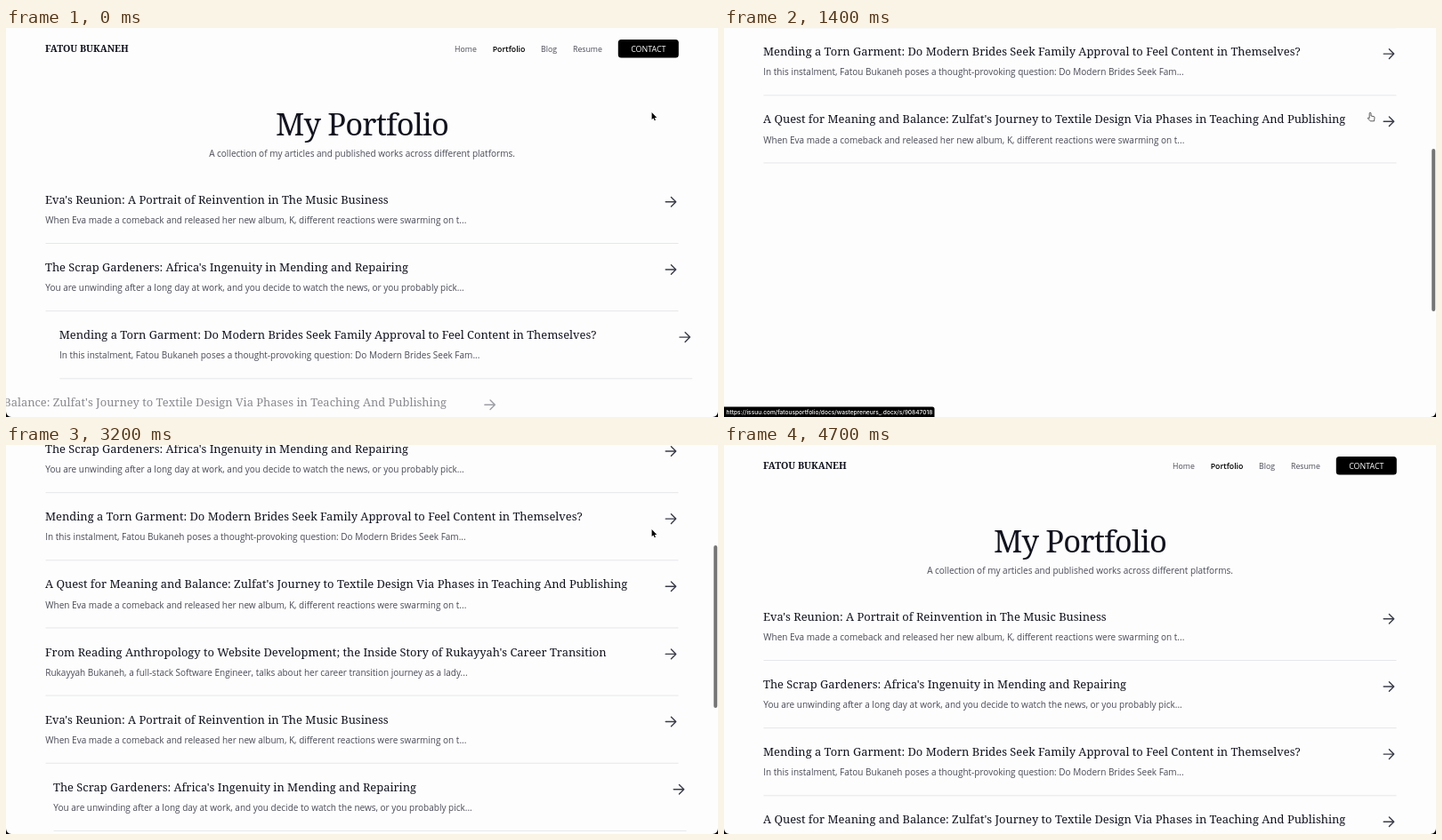
An HTML page that plays this animation: 800x438 px, repeating every 5 s.

```html
<!DOCTYPE html>
<html lang="en">
<head>
<meta charset="utf-8">
<title>My Portfolio</title>
<style>
  html, body { margin: 0; width: 100%; height: 100%; overflow: hidden; background: #fdfdfd; }
  svg { display: block; width: 800px; height: 438px; }
  text { font: 10px "Open Sans", sans-serif; fill: #4a4b57; }
  .brand, .heading, .title { font-family: "Noto Serif", serif; fill: #12131f; }
  .brand { font-size: 10.6px; font-weight: 600; }
  .heading { font-size: 34.5px; letter-spacing: -.85px; text-anchor: middle; }
  .title { font-size: 12.9px; }
  .hover .title { fill: #4b4c56; }
  .nav { font-size: 8.75px; }
  .active { font-weight: 600; fill: #000; }
  .button { font-size: 8.9px; font-weight: 500; fill: #fff; text-anchor: middle; }
  .mid { text-anchor: middle; }
  .rule { stroke: #e6e7ea; }
  .arrow { fill: none; stroke: #3a3c4a; stroke-width: 1.4; stroke-linecap: round; stroke-linejoin: round; }
  #status text { font: 500 6.6px Inter, sans-serif; fill: #fff; }
</style>
</head>
<body>
<svg viewBox="0 0 800 438">
  <rect width="800" height="438" fill="#fdfdfd"/>
  <g id="page">
    <text class="brand" x="44" y="27">FATOU BUKANEH</text>
    <text class="nav" x="504" y="26.5">Home</text>
    <text class="nav active" x="546.7" y="26.5">Portfolio</text>
    <text class="nav" x="601" y="26.5">Blog</text>
    <text class="nav" x="637" y="26.5">Resume</text>
    <rect x="687.8" y="13" width="68" height="20.6" rx="3.5"/>
    <text class="button" x="721.8" y="26.5">CONTACT</text>
    <text class="heading" x="400" y="120.5">My Portfolio</text>
    <text class="mid" x="400" y="144.8">A collection of my articles and published works across different platforms.</text>
    <g id="list"></g>
  </g>
  <rect id="thumb" x="795.2" width="4" height="183" rx="2" fill="#757575"/>
  <g id="status">
    <path id="statusBox"/>
    <text id="statusText" x="2.5" y="434.8"></text>
  </g>
  <path d="M0 432V438H6A6 6 0 0 1 0 432ZM800 432V438H794A6 6 0 0 0 800 432Z"/>
  <g id="cursor">
    <path id="pointer" d="M0 0V8L1.9 6.4 3.1 9.2 4.3 8.7 3.1 6H5.6Z" stroke="#fff" stroke-width=".9" paint-order="stroke"/>
    <path id="hand" transform="translate(-3 0)" fill="#fff" stroke="#333" stroke-width=".8" stroke-linejoin="round"
      d="M2.6 5.2V1.2a.9.9 0 0 1 1.8 0V4l3.2.7q1 .3.8 1.4L7.9 9.8H3.6L.6 6.6q.7-1.4 2 0z"/>
  </g>
</svg>
<script>
const $ = id => document.getElementById(id);
const LOOP = 5000, STEP = 100, PITCH = 76.15, SLIDE = 400;

const articles = [
  ["Eva's Reunion: A Portrait of Reinvention in The Music Business",
   "When Eva made a comeback and released her new album, K, different reactions were swarming on t..."],
  ["The Scrap Gardeners: Africa's Ingenuity in Mending and Repairing",
   "You are unwinding after a long day at work, and you decide to watch the news, or you probably pick..."],
  ["Mending a Torn Garment: Do Modern Brides Seek Family Approval to Feel Content in Themselves?",
   "In this instalment, Fatou Bukaneh poses a thought-provoking question: Do Modern Brides Seek Fam..."],
  ["A Quest for Meaning and Balance: Zulfat's Journey to Textile Design Via Phases in Teaching And Publishing",
   "When Eva made a comeback and released her new album, K, different reactions were swarming on t..."],
  ["From Reading Anthropology to Website Development; the Inside Story of Rukayyah's Career Transition",
   "Rukayyah Bukaneh, a full-stack Software Engineer, talks about her career transition journey as a lady..."]
];

// Entry time of each list row, in ms
const entries = [-2000, -2000, -435, -125, 1580, 2015, 2685, 2950, 3250];

// [time, scroll offset]; negative offsets are overscroll
const scrollKeys = [[0, 0], [200, 0], [600, 56], [700, 70], [1000, 125], [1200, 195], [1400, 319],
  [1600, 425], [1800, 461.3], [2400, 461.3], [2500, 356], [3000, 356], [3200, 265], [3400, 95],
  [3500, 10], [3600, -13.6], [3700, -8], [3800, -3], [3900, 0]];
const cursorX = [[3700, 725.6], [4200, 637], [4600, 549], [4700, 530]];
const cursorY = [[3700, 95], [4200, 41], [4600, 1], [4700, -14]];

// [from, to, box width, address]
const links = [
  [1300, 2400, 236.5, "https://issuu.com/fatousportfolio/docs/wastepreneurs_.docx/s/90847018"],
  [3400, 4000, 266, "themuslimwomentimes.com/…/seaming-a-broken-fabric-do-muslim-women-nee..."]
];

$("list").innerHTML = entries.map((_, i) => {
  const [title, intro] = articles[i % articles.length];
  return `<g><text class="title" x="44" y="198">${title}</text>
    <text x="44.3" y="220.2">${intro}</text>
    <path class="arrow" d="M741.2 195.8H752.7M747.4 190.5L752.7 195.8 747.4 201.1"/>
    <path class="rule" d="M44.5 242.5H755.5"/></g>`;
}).join("");
const rows = [...$("list").children];

function track(keys, t) {
  const i = keys.findIndex(k => k[0] > t);
  if (i === 0) return keys[0][1];
  if (i < 0) return keys[keys.length - 1][1];
  const [t0, a] = keys[i - 1], [t1, b] = keys[i];
  return a + (b - a) * (t - t0) / (t1 - t0);
}

// Underdamped spring: 1 at the start, slightly below 0, then 0
function spring(ms) {
  if (ms <= 0) return 1;
  const u = ms * 0.008;
  return Math.exp(-u) * (Math.cos(u) + Math.sin(u));
}

const show = (el, on) => el.setAttribute("visibility", on ? "visible" : "hidden");
const move = (el, x, y) => el.setAttribute("transform", `translate(${x} ${y})`);

function draw(t) {
  const scroll = track(scrollKeys, t);
  move($("page"), 0, -scroll);
  rows.forEach((row, i) => {
    const away = spring(t - entries[i]);
    move(row, -SLIDE * away, i * PITCH);
    row.setAttribute("opacity", Math.min(1, 1 - away));
  });
  rows[2].classList.toggle("hover", t >= 3400 && t < 4000);

  show($("thumb"), t >= 200 && t < 4200);
  $("thumb").setAttribute("y", 1 + 0.423 * Math.max(0, scroll));

  const link = links.find(([from, to]) => t >= from && t < to);
  $("status").style.display = link ? "" : "none";
  if (link) {
    $("statusBox").setAttribute("d", `M0 426.5H${link[2] - 2.5}q2.5 0 2.5 2.5V438H0Z`);
    $("statusText").textContent = link[3];
  }

  const linked = t >= 1300 && t < 2500;
  show($("hand"), linked);
  show($("pointer"), !linked);
  move($("cursor"), track(cursorX, t), track(cursorY, t));
}

// The screen refreshes ten times a second
const start = performance.now();
function tick() {
  const t = (performance.now() - start) % LOOP;
  draw(Math.floor(t / STEP) * STEP);
  requestAnimationFrame(tick);
}
tick();
</script>
</body>
</html>
```
